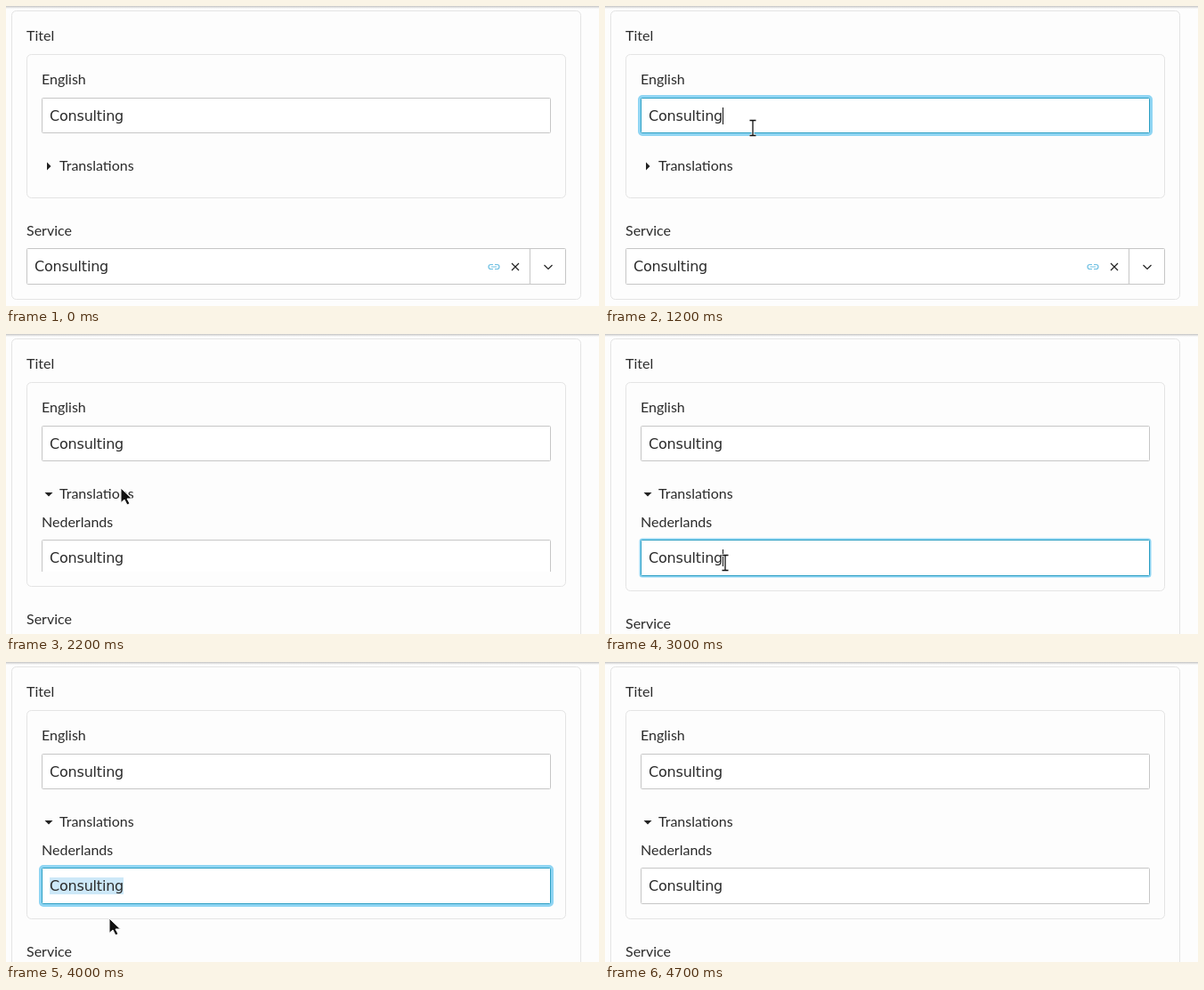
Write an HTML page that moves like this. It is 666 by 337 pixels and loops after 5.3 s.

```html
<!DOCTYPE html>
<html lang="en">
<head>
<meta charset="utf-8">
<title>Translated title field</title>
<style>
  html, body { margin: 0; width: 100%; height: 100%; overflow: hidden; background: #fdfdfd; }
  svg { display: block; width: 666px; height: 337px; }
  text { font: 16px Lato, "Open Sans", sans-serif; fill: #2b2b2b; }
  .value { font-family: "DejaVu Sans", sans-serif; letter-spacing: -.2px; }
  .box { fill: #fdfdfd; stroke: #e4e4e4; }
  .field { fill: #fff; stroke: #c6c6c6; }
  .hover .field { stroke: #a3a3a3; }
  .focus .field { stroke: #2d9fc3; }
  .ring { fill: none; stroke: #8fd5f3; }
  .icon { fill: none; stroke: #222; stroke-width: 1.2; }
  .sel { fill: #cde8f8; }
</style>
</head>
<body>
<svg viewBox="0 0 666 337">
  <defs>
    <linearGradient id="shade" x2="0" y2="1">
      <stop stop-color="#c4c4c4"/><stop offset="1" stop-color="#fdfdfd"/>
    </linearGradient>
    <clipPath id="clip"><rect id="reveal" y="199" width="666"/></clipPath>
  </defs>
  <rect width="666" height="3" fill="url(#shade)"/>
  <rect id="card" class="box" x="6.5" y="5.5" width="639" rx="5"/>
  <rect id="panel" class="box" x="23.5" y="54.5" width="605" rx="5"/>
  <text x="23" y="39">Titel</text>
  <text x="40" y="88">English</text>
  <g id="english">
    <rect class="ring" x="40" y="103" width="572" height="40" rx="2"/>
    <rect class="field" x="40.5" y="103.5" width="571" height="39" rx="1"/>
    <text class="value" x="49" y="129">Consulting</text>
    <path class="caret" d="M132.5 114v19" stroke="#111"/>
  </g>
  <path id="marker" fill="#222"/>
  <text x="60" y="185">Translations</text>
  <g clip-path="url(#clip)">
    <text x="40" y="217">Nederlands</text>
  </g>
  <g id="dutch">
    <rect class="ring" x="40" y="231" width="572" height="41" rx="2"/>
    <g clip-path="url(#clip)">
      <rect class="field" x="40.5" y="231.5" width="571" height="40" rx="1"/>
      <rect id="sel" class="sel" y="242" height="19"/>
      <text class="value" x="49" y="257">Consulting</text>
    </g>
    <path class="caret" d="M132.5 242v19" stroke="#111"/>
  </g>
  <g id="service">
    <text x="23" y="258">Service</text>
    <rect class="field" x="23.5" y="272.5" width="605" height="40" rx="1"/>
    <path d="M588.5 273v39" stroke="#c6c6c6"/>
    <text class="value" x="32" y="298">Consulting</text>
    <path class="icon" style="stroke:#6cbfe2" d="M547 290.5h-2.5a2.5 2.5 0 0 0 0 5h2.5m2-5h2.500a2.500 2.500 0 0 1 0 5h-2.500M545 293h6"/>
    <path class="icon" d="M568 289l8 8m0-8l-8 8"/>
    <path class="icon" d="M604.500 291l4.500 4.500l4.500-4.500"/>
  </g>
  <path id="arrow" d="M0 0V16.500L4 13L7 19L10 17.500L7 12H12.500Z" fill="#111" stroke="#fff"/>
  <g id="beam" fill="none">
    <path d="M-3.500-8.500H3.500M0-8.500V8.500M-3.500 8.500H3.500" stroke="#fff" stroke-width="3"/>
    <path d="M-3.500-8.500H3.500M0-8.500V8.500M-3.500 8.500H3.500" stroke="#111" stroke-width="1.300"/>
  </g>
</svg>
<script>
const LOOP = 5300, STEP = 100;
const el = id => document.getElementById(id);
const clamp = (v, lo, hi) => Math.min(hi, Math.max(lo, v));

// Pointer path: time, x, y
const path = [
  [600, 196, 53], [700, 184, 90], [800, 173, 131], [900, 173, 131],
  [1000, 166, 137], [1300, 166, 137], [1400, 157, 141], [1500, 145, 154],
  [1600, 145, 154], [1700, 136, 165], [1800, 131, 170], [1900, 129, 173],
  [2400, 129, 173], [2800, 134, 254], [3000, 135, 257], [3100, 135, 257],
  [3600, 44, 218], [3700, 44, 218], [4000, 116, 288], [4100, 117, 294],
  [4200, 117, 294], [4600, 170, 23]
];

function pointerAt(t) {
  const i = path.findIndex(k => k[0] >= t);
  if (i < 0 || t < path[0][0]) return null;
  const b = path[i], a = path[i - 1] || b;
  const p = b === a ? 0 : (t - a[0]) / (b[0] - a[0]);
  return { x: a[1] + (b[1] - a[1]) * p, y: a[2] + (b[2] - a[2]) * p };
}

function show(node, on) {
  node.style.display = on ? "" : "none";
}

function setField(id, hover, glow, caret) {
  const g = el(id), ring = g.querySelector(".ring");
  g.setAttribute("class", glow ? "focus" : hover ? "hover" : "");
  show(ring, glow);
  ring.setAttribute("stroke-width", 6 * glow);
  show(g.querySelector(".caret"), caret);
}

function draw(t) {
  const open = t >= 1900;
  const rest = 1 - clamp((t - 1900) / 400, 0, 1);
  const grow = Math.round(73 * (1 - rest * rest));
  el("card").setAttribute("height", 324 + grow);
  el("panel").setAttribute("height", 161 + grow);
  el("reveal").setAttribute("height", grow);
  el("service").setAttribute("transform", `translate(0 ${grow})`);
  el("marker").setAttribute("d", open ? "M43.500 178h9l-4.500 4.500z" : "M46 175.500v9l4.500-4.500z");

  const p = pointerAt(t);
  const over = (top, bottom) => !!p && p.y >= top && p.y <= bottom;
  const overEnglish = over(103, 143), overDutch = open && over(231, 272);
  const dragging = t >= 3100 && t < 3800;

  const glowEnglish = t >= 1200 && t < 1900 ? 1 : t === 1900 ? .5 : 0;
  const glowDutch = t > 3000 && t < 4100 ? 1 : t === 3000 || t === 4100 ? .5 : 0;
  const selecting = t >= 3200 && t < 4100;
  setField("english", overEnglish, glowEnglish, t >= 1200 && t < 1900);
  setField("dutch", overDutch, glowDutch, t >= 3000 && t < 3200);

  const from = t > 3600 ? 49 : clamp(p ? p.x : 132, 49, 132);
  show(el("sel"), selecting);
  el("sel").setAttribute("x", from);
  el("sel").setAttribute("width", 132 - from);

  const beam = overEnglish || overDutch || dragging;
  show(el("beam"), p && beam);
  show(el("arrow"), p && !beam);
  if (p) el(beam ? "beam" : "arrow").setAttribute("transform", `translate(${p.x} ${p.y})`);
}

const start = performance.now();
function tick() {
  const t = (performance.now() - start) % LOOP;
  draw(Math.floor(t / STEP) * STEP);
  requestAnimationFrame(tick);
}
tick();
</script>
</body>
</html>
```
